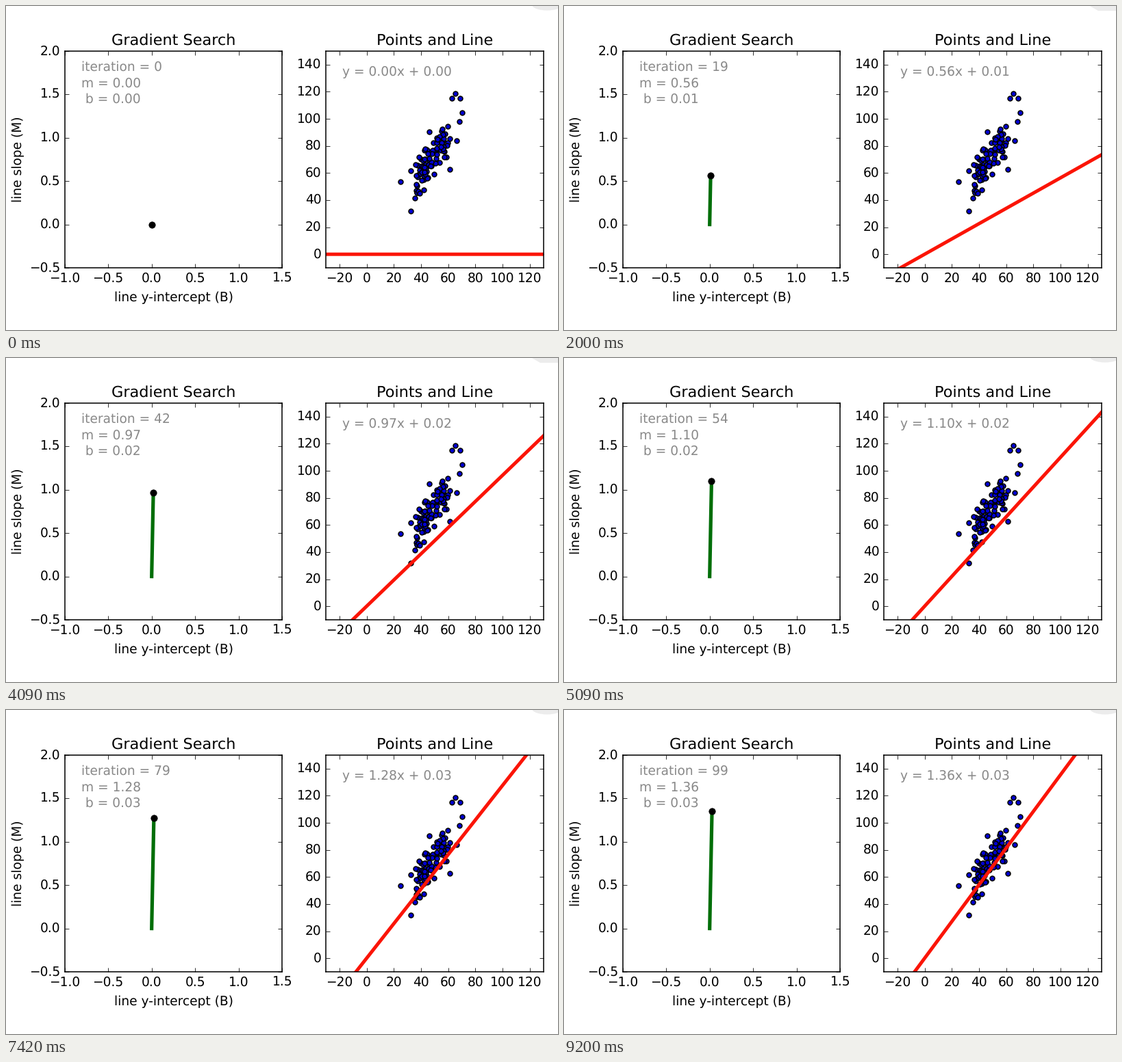
A matplotlib script for the animation above (9230 ms loop, 806 px wide and 474 px high).

```python
import numpy as np
import matplotlib.pyplot as plt
from matplotlib.animation import FuncAnimation
from matplotlib.patches import Ellipse, Polygon
from matplotlib.transforms import Affine2D

W, H, DPI = 806, 474, 64
FRAMES, STEP = 142, 65
PT = 72 / DPI  # points per pixel
FONT = 18.65 * PT
GREY = "#898989"

plt.rcParams.update({
    "font.family": "DejaVu Sans",
    "font.size": FONT,
    "text.hinting": "none",
    "axes.linewidth": 1.55 * PT,
    "lines.solid_capstyle": "projecting",
})

fig = plt.figure(figsize=(W / DPI, H / DPI), dpi=DPI, facecolor="white")
# pixel coordinates with y pointing down
px = Affine2D().scale(1 / W, -1 / H).translate(0, 1) + fig.transFigure


def label(x, y, s="", size=FONT, **kw):
    return fig.text(x, y, s, transform=px, fontsize=size, **kw)


def panel(left, title, xlim, ylim, xticks, yticks):
    top, bottom, width = 66, 383, 317.7
    ax = fig.add_axes([left / W, 1 - bottom / H, width / W, (bottom - top) / H])
    ax.set(xlim=xlim, ylim=ylim, xticks=xticks, yticks=yticks)
    ax.tick_params(direction="in", top=True, right=True, pad=6.2 * PT,
                   length=6.2 * PT, width=0.8 * PT)
    for t in ax.get_yticklabels():
        t.set_va("center")
    label(left + width / 2, 57.3, title, 22.4 * PT, ha="center")
    return ax


search = panel(85.6, "Gradient Search", (-1, 1.5), (-0.5, 2),
               np.arange(-1, 1.6, 0.5), np.arange(-0.5, 2.1, 0.5))
plot = panel(467, "Points and Line", (-30, 130), (-10, 150),
             range(-20, 121, 20), range(0, 141, 20))
label(245, 432, "line y-intercept (B)", ha="center")
label(17.7, 224, "line slope (M)", rotation=90, ha="center", va="center")

# a noisy band around a line, plus the stray points that stand clear of it
rng = np.random.default_rng(4)
x = 32.5 + 32 * rng.beta(1.9, 1.9, 88)
y = 1.3 * x + 9 + rng.triangular(-17, 0, 17, x.size)
stray = [(25, 53.5), (32.2, 31.7), (35.3, 41.4), (39.2, 44.9), (61.3, 62.6),
         (66, 83.9), (68.1, 98), (70.2, 104.4), (68.5, 115), (62.8, 115.3),
         (65.2, 118.8), (46, 90.2)]
plot.scatter(*np.vstack([np.column_stack([x, y]), stray]).T, s=(6.9 * PT) ** 2,
             c="#0000d0", edgecolors="black", linewidths=1.55 * PT,
             zorder=1, snap=False)

fit, = plot.plot([], [], color="#fb1405", lw=5 * PT, snap=False)
trail, = search.plot([], [], color="#006e08", lw=5.2 * PT, snap=False)
head, = search.plot([], [], "ko", ms=9.3 * PT, mew=0.8 * PT, snap=False)

info = [label(110.3, 95 + 23.6 * k, color=GREY) for k in range(3)]
equation = label(491, 101.7, color=GREY)

blob = Ellipse((790, -2), 44, 17, fc="#ececec", transform=px)
wedge = Polygon([(768, 0), (780, 7), (W, 7), (W, 0)], fc="#ececec", transform=px)
fig.add_artist(blob)
fig.add_artist(wedge)

ends = np.array([-40, 140])


def update(i):
    t = (i + 0.75) * STEP
    n = max(0, int((t - 215) / 90.7))
    m = 1.475 * (1 - np.exp(-0.0254 * n))
    b = 0.0198 * m

    fit.set_data(ends, m * ends + b)
    trail.set_data([0, b], [0, m])
    trail.set_visible(n > 0)
    head.set_data([b], [m])

    lines = f"iteration = {n}", f"m = {m:.2f}", f" b = {b:.2f}"
    for txt, s in zip(info, lines):
        txt.set_text(s)
    equation.set_text(f"y = {m:.2f}x + {b:.2f}")

    slanted = 950 < t < 4800
    wedge.set_visible(slanted)
    blob.set_visible(not slanted)
    return fit, trail, head, equation, *info, wedge, blob


anim = FuncAnimation(fig, update, frames=FRAMES, interval=STEP, repeat=True,
                     repeat_delay=0, init_func=lambda: update(0))
plt.show()
```
